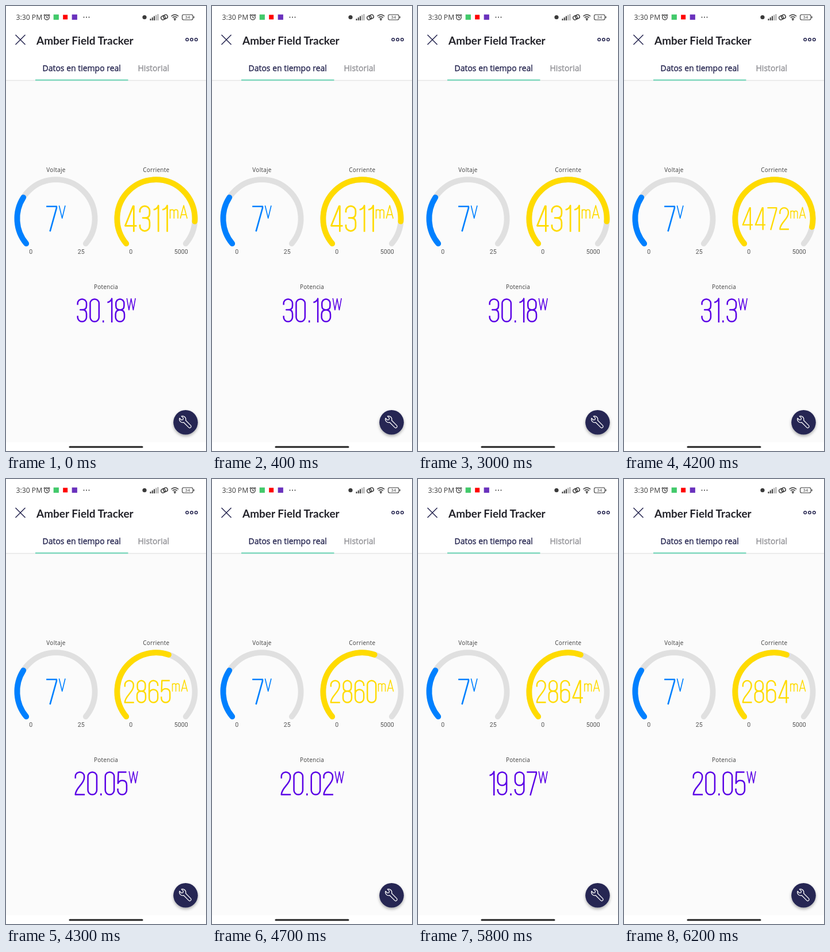
An HTML page that plays this animation: 348x772 px, repeating every 8000 ms.

```html
<!DOCTYPE html>
<html lang="es">
<head>
<meta charset="utf-8">
<title>Monitor</title>
<style>
  html, body { margin: 0; width: 100%; height: 100%; overflow: hidden; background: #fbfbfb; }
  svg { display: block; width: 348px; height: 772px; }
  text { font-family: "Open Sans", "Noto Sans", sans-serif; }
  .line { fill: none; stroke: currentColor; }
  .title { font: 700 19px Lato, sans-serif; fill: #222229; }
  .tab { font-size: 14px; text-anchor: middle; fill: currentColor; stroke: currentColor; stroke-width: .35px; }
  .label { font-size: 10px; letter-spacing: .25px; text-anchor: middle; fill: #404040; }
  .limit { font: 10.6px Roboto, sans-serif; text-anchor: middle; fill: #555; }
  .arc { fill: none; stroke-width: 9.8; stroke-linecap: round; }
  .digits { fill: none; stroke: currentColor; stroke-linejoin: round; }
</style>
</head>
<body>
<svg viewBox="0 0 348 772">
  <defs>
    <path id="arc" d="M-51.8 43.5A67.6 67.6 0 1 1 51.8 43.5" pathLength="1"/>
    <filter id="shadow" x="-40%" y="-40%" width="180%" height="190%">
      <feDropShadow dx="0" dy="2.6" stdDeviation="2.6" flood-opacity=".32"/>
    </filter>
  </defs>
  <rect width="348" height="772" fill="#fbfbfb"/>
  <rect width="348" height="129" fill="#fff"/>
  <rect y="757" width="348" height="15" fill="#fff"/>
  <rect y="128.5" width="348" height="1.2" fill="#e2e2e2"/>
  <rect x="51" y="127.3" width="161.5" height="2.4" fill="#7ed9be"/>

  <!-- Status bar -->
  <g color="#3a3a3a" fill="#3a3a3a">
    <text x="17.5" y="24" font-size="12.2">3:30 PM</text>
    <g class="line" stroke-width="1.3">
      <circle cx="71" cy="19.7" r="4.2"/>
      <path d="M71 17.2v2.8l2 1M65.6 16.4l2.4-2M76.4 16.4l-2.4-2"/>
    </g>
    <rect x="82.7" y="14.7" width="9.2" height="9.2" fill="#42c96b"/>
    <rect x="99.2" y="15.3" width="8" height="8" fill="#f00"/>
    <rect x="114.7" y="14.7" width="9.2" height="9.2" fill="#6a32bd"/>
    <circle cx="135.5" cy="19.5" r="1"/><circle cx="140" cy="19.5" r="1"/><circle cx="144.5" cy="19.5" r="1"/>
    <circle cx="241" cy="19.5" r="3.6"/>
    <path d="M250.5 22h2v3h-2zM253.8 19.8h2V25h-2zM257 17.6h2V25h-2z"/>
    <path d="M260.2 15.6h2V25h-2zM263.4 14h2v11h-2z" opacity=".45"/>
    <g class="line" stroke-width="1.5" transform="rotate(-25 275.5 19.5)">
      <rect x="269.5" y="16.2" width="7.5" height="6.6" rx="3.3"/>
      <rect x="274" y="16.2" width="7.5" height="6.6" rx="3.3"/>
    </g>
    <g class="line" stroke-width="1.5">
      <path d="M287.5 17.8q6.3-5.5 12.6 0M289.7 20.3q4.1-3.5 8.2 0M291.8 22.6q2-1.6 4 0"/>
      <rect x="306.6" y="15" width="18.5" height="9" rx="2.6" stroke-width="1.1"/>
    </g>
    <circle cx="293.8" cy="24" r="1.2"/>
    <rect x="326.2" y="17.8" width="1.4" height="3.4" rx=".6"/>
    <text x="315.9" y="22.4" font-size="7.5" text-anchor="middle">34</text>
  </g>

  <!-- Header and tabs -->
  <g class="line" color="#24244f" stroke-width="1.5">
    <path d="M16.5 50l17 17M33.5 50L16.5 67"/>
    <circle cx="315.2" cy="58.3" r="2.3"/><circle cx="323" cy="58.3" r="2.3"/><circle cx="330.8" cy="58.3" r="2.3"/>
  </g>
  <text class="title" x="53" y="66.5">Amber Field Tracker</text>
  <text class="tab" x="131.7" y="113" color="#24244f">Datos en tiempo real</text>
  <text class="tab" x="256.8" y="113" color="#909095">Historial</text>

  <!-- Readings -->
  <text class="label" x="87" y="287.5">Voltaje</text>
  <text class="label" x="261.3" y="287.5">Corriente</text>
  <text class="label" x="174" y="490.5">Potencia</text>
  <g transform="translate(87 368.7)" color="#0080ff">
    <use href="#arc" class="arc" stroke="#e0e0e0"/>
    <use href="#arc" class="arc" stroke="currentColor" stroke-dasharray=".28 2"/>
    <g id="voltage" class="digits" role="img"></g>
  </g>
  <g transform="translate(261 368.7)" color="#ffdb00">
    <use href="#arc" class="arc" stroke="#e0e0e0"/>
    <use href="#arc" id="currentArc" class="arc" stroke="currentColor"/>
    <g id="current" class="digits" role="img"></g>
  </g>
  <g transform="translate(174.6 528)" color="#5a00e6">
    <g id="power" class="digits" role="img"></g>
  </g>
  <text class="limit" x="43.2" y="430.3">0</text>
  <text class="limit" x="130.7" y="430.3">25</text>
  <text class="limit" x="217.2" y="430.3">0</text>
  <text class="limit" x="304.7" y="430.3">5000</text>

  <!-- Settings button and home bar -->
  <circle cx="312.5" cy="722.3" r="21.3" fill="#252653" filter="url(#shadow)"/>
  <path class="line" color="#fff" stroke-width="1.3" stroke-linejoin="round" transform="translate(312.6 722.3) rotate(45) scale(.95)"
    d="M-13.3-2.5H-8.5L-7 0L-8.5 2.5H-13.3A6 6 0 0 0-2.6 2.6H10.5A2.6 2.6 0 0 0 10.5-2.6H-2.6A6 6 0 0 0-13.3-2.5Z"/>
  <rect x="109.5" y="763.4" width="129" height="3" rx="1.5" fill="#222"/>
</svg>
<script>
  // Thin condensed numerals on a 42-unit cap height: [width, stroke path]
  const CAP = 42, GAP = 3.6, UNIT_GAP = 2, UNIT_SCALE = .5;
  const GLYPHS = {
    0: [18.2, "M1.4 9a7.7 7.6 0 0 1 15.4 0V33a7.7 7.6 0 0 1-15.4 0Z"],
    1: [10.4, "M1.2 7.2Q7 6 8.9 .6V42"],
    2: [18.2, "M1.4 12.5V9a7.7 7.6 0 0 1 15.4 0V11C16.8 22 1.4 29 1.4 40.6H17.8"],
    3: [18.2, "M1.4 11.5V9a7.7 7.6 0 0 1 15.4 0V13Q16.8 20 9.5 20H6H9.5Q16.8 20 16.8 27V33a7.7 7.6 0 0 1-15.4 0V30.5"],
    4: [19.6, "M15 42V1.4H14L1.4 32.5H19.6"],
    5: [18.2, "M16.4 1.4H2.4L1.7 21Q4 16 9.2 16Q16.8 16 16.8 24V33a7.7 7.6 0 0 1-15.4 0V30"],
    6: [18.2, "M16.8 11V9a7.7 7.6 0 0 0-15.4 0V33a7.7 7.6 0 0 0 15.4 0V25a7.7 7.6 0 0 0-15.4 0"],
    7: [18, "M0 1.4H16.6V4L6 42"],
    8: [18.2, "M9.1 20.2Q2 20.2 2 13V9a7.1 7.6 0 0 1 14.2 0V13Q16.2 20.2 9.1 20.2Q1.4 20.2 1.4 28V33a7.7 7.6 0 0 0 15.4 0V28Q16.8 20.2 9.1 20.2Z"],
    9: [18.2, "M1.4 31V33a7.7 7.6 0 0 0 15.4 0V9a7.7 7.6 0 0 0-15.4 0V17a7.7 7.6 0 0 0 15.4 0"],
    ".": [4.8, "M2.4 38.4V42"],
    V: [23, "M1.6 0L11.5 41L21.4 0"],
    W: [33, "M1.6 0L9 40.5L16.5 1.5L24 40.5L31.4 0"],
    m: [29, "M2 42V13M2 21q0-7 6.2-7t6.2 7V42M14.4 21q0-7 6.2-7t6.2 7V42"],
    A: [25, "M1.6 42L12.5 1L23.4 42M4.8 30H20.2"]
  };

  const byId = id => document.getElementById(id);

  function layout(chars, x, scale, strokeWidth) {
    let markup = "";
    for (const char of chars) {
      const [width, path] = GLYPHS[char];
      markup += `<path d="${path}" stroke-width="${strokeWidth}" transform="translate(${x}) scale(${scale})"/>`;
      x += (width + GAP) * scale;
    }
    return { markup, end: x - GAP * scale };
  }

  // Centres a reading and scales it to its maximum width or size.
  function showReading(id, value, unit, maxScale, maxWidth) {
    const group = byId(id), label = `${value} ${unit}`;
    if (group.getAttribute("aria-label") === label) return;
    const number = layout(String(value), 0, 1, 2.5);
    const suffix = layout(unit, number.end + UNIT_GAP, UNIT_SCALE, 3.1);
    const scale = Math.min(maxScale, maxWidth / suffix.end);
    group.setAttribute("aria-label", label);
    group.setAttribute("transform", `scale(${scale}) translate(${-suffix.end / 2} ${-CAP / 2})`);
    group.innerHTML = number.markup + suffix.markup;
  }

  // [start in ms, milliamps, watts]
  const LOOP = 8000;
  const STEPS = [
    [0, 4311, 30.18], [4200, 4472, 31.3], [4300, 2865, 20.05], [4700, 2860, 20.02],
    [5200, 2853, 20.02], [5500, 2853, 19.97], [5800, 2864, 19.97], [6000, 2864, 20.05]
  ];

  showReading("voltage", 7, "V", 1.07, 111);

  function render(now) {
    const time = now % LOOP;
    const [, milliamps, watts] = STEPS.filter(([start]) => start <= time).pop();
    showReading("current", milliamps, "mA", 1.1, 111);
    showReading("power", watts, "W", 1, 120);
    byId("currentArc").setAttribute("stroke-dasharray", `${milliamps / 5000} 2`);
  }

  const origin = performance.now();
  function tick() {
    render(performance.now() - origin);
    requestAnimationFrame(tick);
  }
  tick();
</script>
</body>
</html>
```
